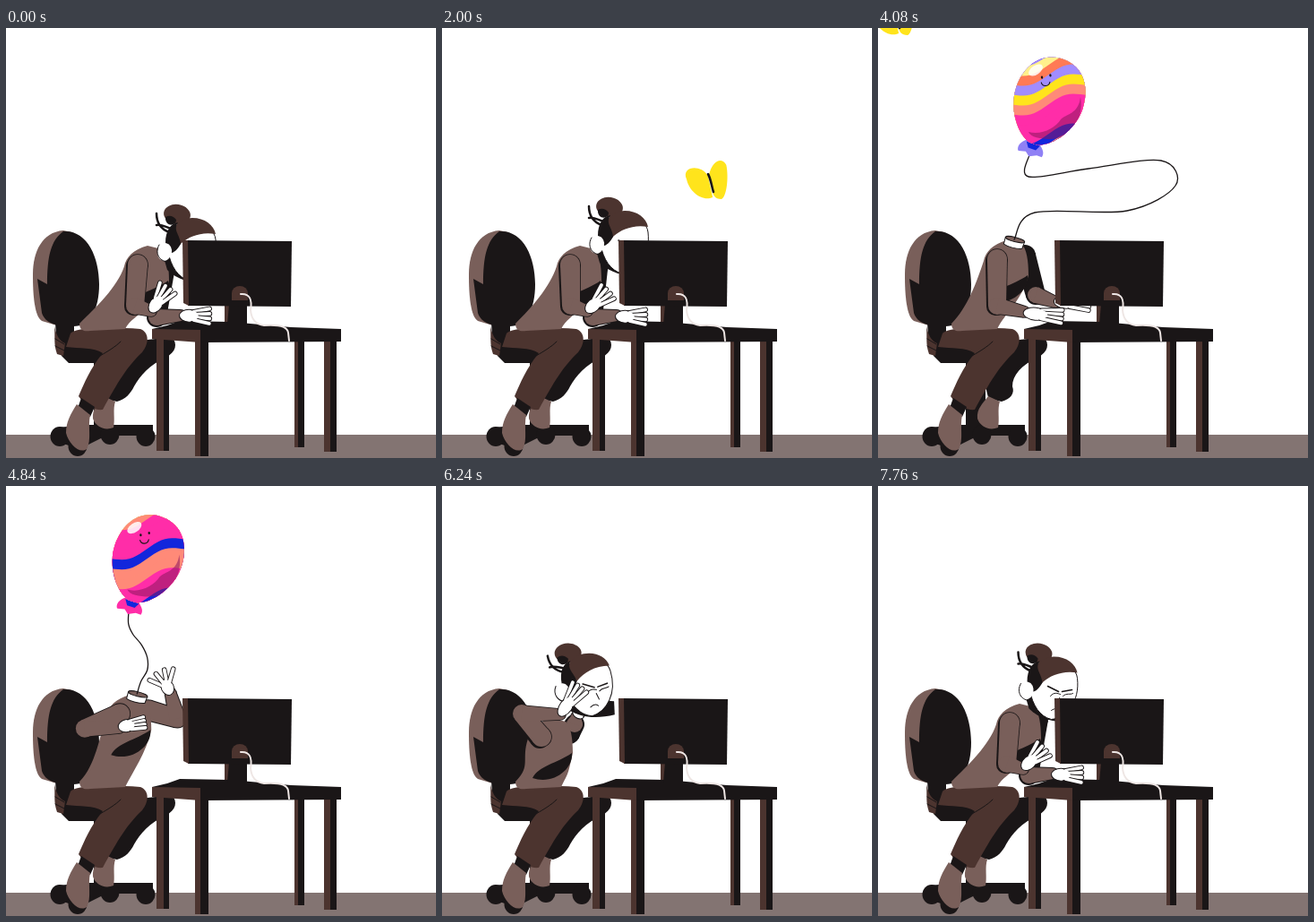
Animation of 480x480 px, one loop 7.84 s. Source, as an HTML page with a canvas:

```html
<!DOCTYPE html>
<html lang="en">
<head>
<meta charset="utf-8">
<title>Drifting off at work</title>
<style>
html, body { margin: 0; height: 100%; overflow: hidden; background: #fff; }
canvas { display: block; width: 100vw; height: 100vh; }
</style>
</head>
<body>
<canvas id="stage" width="480" height="480"></canvas>
<script>
const ctx = document.getElementById('stage').getContext('2d');
const LOOP = 7840, TICK = 40, TURN = 2 * Math.PI;
const DETACH = 2520, REATTACH = 6060;
const INK = '#1a1617', DARK = '#4c342f', MID = '#795f5a', FLOOR = '#837472', WHITE = '#fff';
const YELLOW = '#ffe41c', SALMON = '#ff8a78', ORANGE = '#ff7a55', PINK = '#ff2da8', BLUE = '#1226dc', LILAC = '#a18cff', CREAM = '#fff08c';

const lerp = (a, b, k) => a + (b - a) * k;
const mix = (a, b, k) => a.map((v, i) => lerp(v, b[i], k));
const ramp = (t, a, b) => {
  const k = Math.min(1, Math.max(0, (t - a) / (b - a)));
  return k * k * (3 - 2 * k);
};

function line(color, width, d) {
  ctx.strokeStyle = color;
  ctx.lineWidth = width;
  ctx.stroke(d instanceof Path2D ? d : new Path2D(d));
}
function fill(color, d, edge = 0) {
  const p = new Path2D(d);
  ctx.fillStyle = color;
  ctx.fill(p);
  if (edge) line(INK, edge, p);
}
function oval(color, x, y, rx, ry, rot = 0, edge = 0) {
  const p = new Path2D();
  p.ellipse(x, y, rx, ry, rot, 0, TURN);
  fill(color, p, edge);
}
function group(draw, x = 0, y = 0, rot = 0, sx = 1, sy = sx) {
  ctx.save();
  ctx.translate(x, y);
  ctx.rotate(rot);
  ctx.scale(sx, sy);
  draw();
  ctx.restore();
}

// Smooth path through rows of [time, ...values].
function glide(rows, t) {
  const n = rows.length - 1;
  t = Math.min(rows[n][0], Math.max(rows[0][0], t));
  const i = Math.max(0, rows.findIndex(r => r[0] >= t) - 1);
  const a = rows[i], b = rows[i + 1], p = rows[Math.max(0, i - 1)], q = rows[Math.min(n, i + 2)];
  const span = b[0] - a[0], k = (t - a[0]) / span;
  return a.slice(1).map((v, j) => {
    const c = j + 1;
    const m0 = (b[c] - p[c]) / (b[0] - p[0]) * span;
    const m1 = (q[c] - v) / (q[0] - a[0]) * span;
    return lerp(v, b[c], k * k * (3 - 2 * k)) + m0 * k * (1 - k) ** 2 - m1 * k * k * (1 - k);
  });
}

function chair() {
  fill(MID, 'M64 226C40 228 30 250 30 275C30 300 32 322 40 327L60 333L74 228Z');
  fill(INK, 'M64 227C90 225 104 255 104 286C104 314 94 333 75 333C56 333 44 330 40 318L35 280L46 286C46 255 50 237 64 227Z');
  fill(INK, 'M55 328H76V354H160V374H70L62 366L56 345ZM98 370H120V445H98Z');
  fill(DARK, 'M54 333C57 347 62 350 66 352L64 366L57 364C53 352 55 348 54 333Z');
  line(INK, 1, 'M55 347L65 353M55 355L65 360');
  fill(INK, 'M56 446L92 443H164V455H112L82 470L58 462Z');
  for (const [x, y] of [[60, 456], [80, 467], [116, 454], [156, 456]]) oval(INK, x, y, 10.5, 11);
}

function legs(step) {
  fill(INK, `M${110 + step} 414C116 395 122 372 140 350L185 345C192 352 190 362 178 368C160 376 150 388 ${143 + step / 2} 400C${139 + step} 408 ${134 + step} 414 ${124 + step} 417Z`);
  group(() => fill(MID, 'M109 411L122 417C119 425 122 437 120 446C110 450 100 445 97 436C96 425 103 419 109 411Z'), step);
  fill(DARK, 'M72 341C80 333 120 334 150 336C160 340 160 352 152 362C135 378 125 395 108 426C100 427 88 422 81 411C88 395 94 380 108 363C98 356 82 358 67 356Z');
  line(INK, 1, 'M105 366C115 360 122 356 128 350');
  fill(INK, 'M84 413L99 423L94 434L79 427Z');
  fill(MID, 'M79 420L94 432C91 445 96 460 90 470C82 476 70 464 67 452C67 440 72 431 79 420Z');
}

function desk() {
  const leg = (x, mid, end, foot) => {
    fill(DARK, `M${x} 345H${mid}V${foot}H${x}Z`);
    fill(INK, `M${mid} 345H${end}V${foot}H${mid}Z`);
  };
  leg(322, 326, 333, 468);
  leg(168, 176, 182, 472);
  leg(211, 217, 226, 478);
  leg(355, 362, 369, 473);
  fill(INK, 'M163 336L180 332L194 327L250 328L318 334L374 336V350L217 351Z');
  fill(DARK, 'M163 336L217 337V351L163 347Z');
}

function monitor() {
  fill(DARK, 'M244 308H252V328H244Z');
  fill(INK, 'M249 308H269V332H247Z');
  fill(INK, 'M202 237L319 238L318 311L203 310Z');
  fill(DARK, 'M197 237L203 237L204 310L198 307Z');
  fill(DARK, 'M252 304V296A9 8 0 0 1 270 296V304Z');
  line('#eee6e4', 2, 'M262 297C272 296 275 303 273 315C274 326 279 331 288 332C302 331 314 332 315 340L316 349');
}

function head() {
  fill(INK, 'M176 256L232 270L230 285C210 286 192 282 180 270Z');
  fill(WHITE, 'M186 235C196 214 232 216 234 236C237 262 222 280 205 282C192 279 184 266 181 250Z', 1);
  oval(DARK, 191, 208, 15, 11, .15);
  fill(INK, 'M178 211C177 222 190 222 190 214C186 209 182 209 178 211Z');
  line(INK, 2.5, 'M182 228C172 224 168 216 168 207M184 224C176 221 172 219 168 220');
  fill(DARK, 'M181 248C182 226 192 212 208 212C222 212 232 220 234 230C218 227 204 233 196 240C190 246 186 250 181 248Z');
  fill(INK, 'M178 240C178 226 184 218 192 217C186 226 194 230 195 241C190 250 184 254 179 249Z');
  oval(WHITE, 177, 250, 8, 10, .2);
  line(INK, 1, 'M171 242C166 250 170 260 180 261');
  line(INK, 1.6, 'M201 245L213 251M217 251L228 249');
  line(INK, 1, 'M204 256C208 251 212 253 215 254M218 256C222 252 226 255 229 253M214 258L216 265M205 272C209 269 212 270 214 272');
}

const BAND = 11;
const BANDS = [SALMON, SALMON, PINK, PINK, BLUE, LILAC, CREAM, ORANGE, LILAC, YELLOW, SALMON, PINK, PINK, PINK, BLUE];
const SKIN = 'M0-50C26-50 39-28 39-4C39 22 20 46 4 50H-4C-20 46-39 22-39-4C-39-28-26-50 0-50Z';
const FLIGHT = [ // time, x, y, tilt
  [DETACH, 200, 228, 0], [2860, 285, 160, 0], [3120, 344, 126, -.25], [3440, 362, 84, -.2],
  [4080, 190, 82, .34], [5560, 153, 82, .23], [5700, 153, 84, .2], [REATTACH, 172, 232, 0]
];

// Bands slide up at a steady speed, each painted over the one above.
function stripes(t) {
  const top = -57 - (t - 3120) * .063, n = BANDS.length;
  for (let i = Math.floor((-80 - top) / BAND); top + i * BAND < 80; i++) {
    let d = 'M-60 90';
    for (let x = -60; x <= 60; x += 4) d += `L${x} ${top + i * BAND - .3 * x - 5 * Math.sin(x / 12)}`;
    fill(BANDS[(i % n + n) % n], d + 'L60 90Z');
  }
}

function face(t) {
  oval(INK, -6, -2, 1.5, 2);
  oval(INK, 6, -3, 1.5, 2);
  if (t < 3700) fill(INK, 'M-6 6C0 9 4 6 6 4C6 14 2 22-2 22C-5 20-4 12-6 6Z');
  else line(INK, 1.4, t < 5000 ? 'M-8 5C-7 12 2 12 4 6' : 'M-9 13C-8 7-3 6-1 11');
}

function balloon(t, x, y, tilt, size) {
  const [knot, tie] = t < 3600 ? ['#ff4d9d', '#a02a78'] : t < 4800 ? ['#8f80f5', BLUE] : [PINK, BLUE];
  group(() => {
    ctx.save();
    ctx.rotate(tilt);
    fill(knot, 'M-6 47C-16 52-16 61-13 63L-5 61L0 65L8 61L14 61C16 54 9 51 6 47Z');
    fill(tie, 'M-8 50H8L5 56H-4Z');
    ctx.clip(new Path2D(SKIN));
    ctx.rotate(-tilt);
    stripes(t);
    ctx.globalAlpha = .55;
    fill('#8a1660', 'M36-5C40 16 28 42 2 42C-8 42-20 40-22 34C-8 38 8 30 14 20C20 14 34 14 36-5Z');
    ctx.globalAlpha = .85;
    oval(WHITE, lerp(-25, -14, ramp(t, 3120, 4080)), -35, 9, 5, -.6);
    ctx.restore();
    const turn = ramp(t, 3120, 4080);
    group(() => face(t), lerp(-14, -2, turn), lerp(-37, -26, turn), -.15, lerp(1, .8, turn));
    if (t > 2950 && t < 3350) {
      line('#ff4a5c', 1.4, 'M-25-70V-49M-31-60H-19M-12-67V-50M-17-58H-8');
      line(WHITE, 1.3, 'M21-27V-18M17-22H25M7-46V-40M4-43H10');
    }
  }, x, y, 0, size);
}

// Inner points of the string while it trails, then drifts.
const TRAIL = [185, 235, 222, 242, 258, 235, 292, 237, 338, 261, 388, 222];
const DRIFT = [175, 206, 278, 204, 332, 176, 316, 148, 235, 157, 168, 166];

function string(t, from, to) {
  const count = TRAIL.length / 2 + 1;
  let inner = [];
  for (let i = 1; i < count; i++) {
    const [x, y] = mix(from, to, i / count);
    inner.push(x + 5 * Math.sin(i / count * TURN), y);
  }
  const loose = mix(TRAIL, DRIFT, ramp(t, 3120, 4080));
  inner = mix(inner, loose, ramp(t, DETACH, 3120) - ramp(t, 4120, 4980));
  const v = [...from, ...inner, ...to];
  const pt = n => { n = Math.max(0, Math.min(count, n)); return [v[2 * n], v[2 * n + 1]]; };
  let d = 'M' + from;
  for (let n = 0; n < count; n++) {
    const a = pt(n), b = pt(n + 1);
    const c1 = a.map((q, i) => q + (b[i] - pt(n - 1)[i]) / 6);
    const c2 = b.map((q, i) => q - (pt(n + 2)[i] - a[i]) / 6);
    d += `C${c1} ${c2} ${b}`;
  }
  line(INK, 1.3, d);
}

const WINGS = [ // time, x, y
  [880, -25, 160], [1450, 140, 170], [2000, 300, 173], [2480, 312, 75], [3120, 203, 57], [4080, 21, -10], [4280, -25, -40]
];
function butterfly(t) {
  if (t < 880 || t > 4280) return;
  const [x, y] = glide(WINGS, t);
  const flap = .7 + .38 * Math.cos((t - 2000) / 160 * TURN);
  group(() => {
    group(() => {
      fill(YELLOW, 'M-3-8C-10-20-31-18-25-4C-22 10-8 20 2 15Z');
      fill(YELLOW, 'M-2-8C2-25 12-27 16-19C19-5 16 16 11 17C4 17 2 12 2 8Z');
    }, 0, 0, 0, flap, 1.06);
    line(INK, 2.6, 'M-3-10C0-5 1 4 3 10');
  }, x, y);
}

// Arms: elbow x, y, wrist x, y, hand angle, finger spread, hand length.
const POSES = [
  { neck: [166, 246], near: [144, 310, 162, 316, -.95, .22, 36], far: [168, 323, 195, 321, .02, .14, 36] },
  { neck: [152, 240], near: [133, 310, 164, 317, .1, .08, 46], far: [176, 298, 198, 306, .1, .06, 42] },
  { neck: [146, 236], near: [86, 269, 125, 268, -.2, .06, 31], far: [192, 258, 183, 228, -2.1, .5, 30] },
  { neck: [130, 262], near: [89, 254, 132, 255, -.95, .16, 42], far: [148, 266, 150, 258, -1, .1, 16] }
];

function bone(color, x1, y1, r1, x2, y2, r2) {
  const a = Math.atan2(y2 - y1, x2 - x1) + TURN / 4, c = Math.cos(a), s = Math.sin(a);
  oval(color, x1, y1, r1, r1);
  oval(color, x2, y2, r2, r2);
  fill(color, `M${x1 + r1 * c} ${y1 + r1 * s}L${x2 + r2 * c} ${y2 + r2 * s}L${x2 - r2 * c} ${y2 - r2 * s}L${x1 - r1 * c} ${y1 - r1 * s}Z`);
}
function arm(upper, lower, sx, sy, ex, ey, wx, wy, grow = 0) {
  bone(upper, sx, sy, 11 + grow, ex, ey, 10 + grow);
  bone(lower, ex, ey, 9 + grow, wx, wy, 6 + grow);
}
function hand(x, y, angle, spread, len) {
  group(() => {
    oval(WHITE, len * .26, 0, len * .3, 7, 0, 1);
    for (let i = -1.5; i < 2; i++) {
      const a = i * spread, x0 = len * .4, y0 = i * 3;
      const d = `M${x0} ${y0}L${x0 + len * .5 * Math.cos(a)} ${y0 + len * .5 * Math.sin(a)}`;
      line(INK, 5.6, d);
      line(WHITE, 3.8, d);
    }
    oval(WHITE, len * .28, 0, len * .27, 6);
  }, x, y, angle);
}

function torso(x, y) {
  const cx = x + 16, cy = y + 36;
  fill(MID, `M${x - 8} ${y - 3}C${x - 24} ${y + 1} ${x - 32} ${y + 10} ${x - 34} ${y + 20}C${x - 42} ${y + 44} 100 312 82 330C82 338 88 339 94 338L133 336C142 318 ${cx - 6} ${cy + 26} ${cx} ${cy}C${cx} ${cy - 16} ${x + 14} ${y + 6} ${x + 8} ${y + 1}Z`);
  fill(INK, `M${cx - 1} ${cy}C${cx + 1} ${cy + 18} ${cx - 22} ${cy + 36} ${cx - 45} ${cy + 28}C${cx - 38} ${cy + 14} ${cx - 18} ${cy + 12} ${cx - 1} ${cy}Z`);
}
function collar() {
  fill(WHITE, 'M-11-4L11-4L10 4C4 6-6 6-11 4Z', 1);
  oval(MID, 0, -4, 11, 2.5, 0, 1);
}

function person(t) {
  const p = ramp(t, 2500, 2800) + ramp(t, 4400, 4900) + ramp(t, 5700, REATTACH) + ramp(t, 6480, 6840);
  const a = POSES[Math.floor(p) % 4], b = POSES[Math.ceil(p) % 4];
  const part = key => mix(a[key], b[key], p % 1);
  const lean = 10 * (ramp(t, 2500, 2800) - ramp(t, 3200, 4000)) - 4 * (ramp(t, 1600, 2000) - ramp(t, 2280, DETACH));
  const tap = p < 2 || p === 4 ? Math.sin(t / 320 * TURN) : 0;
  const chin = p < 1 || p === 4 ? .2 - .2 * Math.cos(t / 320 * TURN) : 0;
  const near = part('near'), far = part('far');
  let [x, y] = part('neck');
  x += lean;

  arm(INK, INK, x + 12, y + 14, ...far.slice(0, 4), 1);
  arm(p > 1.5 && p < 3 ? MID : INK, MID, x + 12, y + 14, ...far.slice(0, 4));
  hand(far[2], far[3] + tap, ...far.slice(4));
  torso(x, y);

  if (t >= DETACH && t < REATTACH) {
    const [bx, by, tilt] = glide(FLIGHT, t);
    const size = .6 + .4 * (ramp(t, DETACH, 3120) - ramp(t, 5700, REATTACH));
    group(collar, x, y, .25);
    string(t, [x, y - 4], [bx - 62 * size * Math.sin(tilt), by + 62 * size * Math.cos(tilt)]);
    balloon(t, bx, by, tilt, size);
  } else {
    const look = ramp(t, 1600, 1920), rise = ramp(t, 2280, DETACH);
    const fret = t < DETACH ? 0 : 1 - ramp(t, 6480, 6840);
    const rest = -2 * (ramp(t, 7160, 7700) - ramp(t, 7720, LOOP));
    group(() => { ctx.translate(-195, -255); head(); },
      195 - 4 * look - 6 * rise - 32 * fret + rest, 255 - 8 * look - 12 * rise - 3 * fret + rest, -.18 * fret);
  }

  arm(INK, INK, x - 19, y + 18, ...near.slice(0, 4), .8);
  bone(INK, x - 21, y + 20, 11, near[0] - 2, near[1] + 1, 10);
  arm(MID, MID, x - 19, y + 18, ...near.slice(0, 4));
  if (t > 4900 && t < 5720) line('#d8c8c4', 1.6, 'M148 272C150 290 146 298 139 301C132 298 134 288 135 280');
  hand(near[2], near[3] - (p > .5 ? tap : 0), near[4] + chin, near[5], near[6]);
}

function draw(t) {
  ctx.fillStyle = WHITE;
  ctx.fillRect(0, 0, 480, 480);
  ctx.fillStyle = FLOOR;
  ctx.fillRect(0, 454, 480, 26);
  chair();
  legs(14 * (ramp(t, 3800, 4060) - ramp(t, 4400, 4800)));
  desk();
  person(t);
  monitor();
  butterfly(t);
}

ctx.lineCap = ctx.lineJoin = 'round';
const start = performance.now();
function frame() {
  const t = (performance.now() - start) % LOOP;
  draw(Math.floor(t / TICK) * TICK);
  requestAnimationFrame(frame);
}
frame();
</script>
</body>
</html>
```
